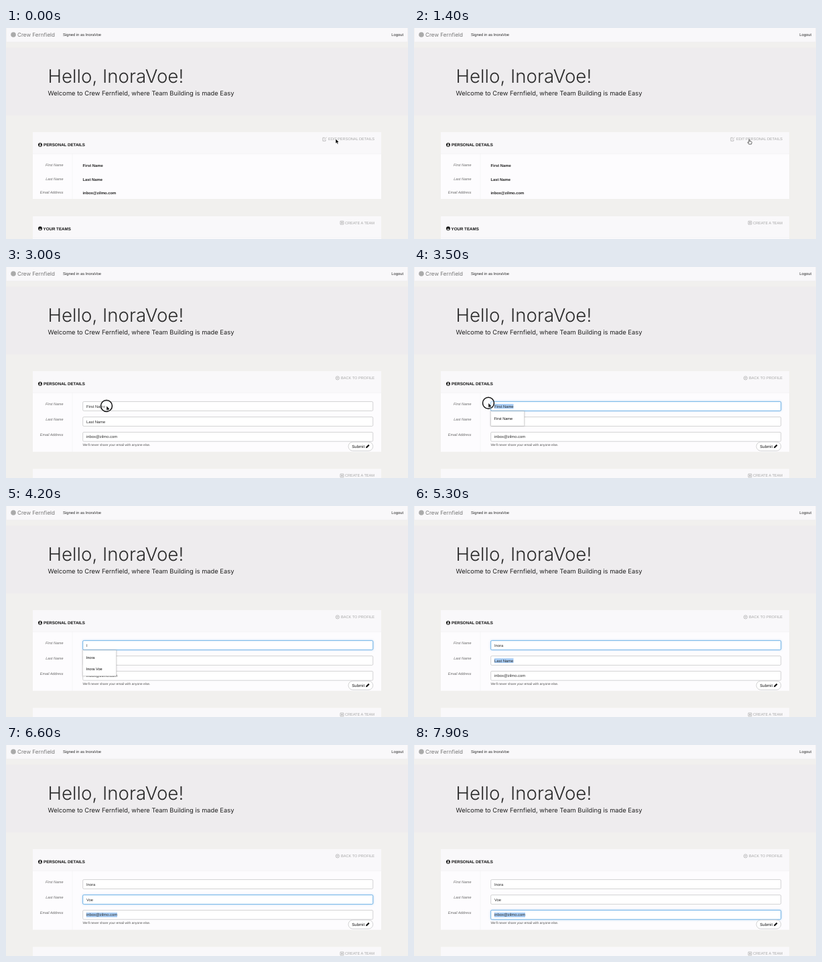
Write an HTML page that moves like this. It is 600 by 316 pixels and loops after 8 s.

```html
<!DOCTYPE html>
<html lang="en">
<head>
<meta charset="utf-8">
<title>Profile form</title>
<style>
  html, body { margin: 0; width: 100%; height: 100%; overflow: hidden; background: #f1f0ee; }
  svg { display: block; width: 600px; height: 316px; }
  text { font-family: "Liberation Sans", Arial, sans-serif; font-size: 5.83px; fill: #2b2b2b; text-rendering: geometricPrecision; }
  .brand { font-family: Inter, sans-serif; }
  .label { font-size: 5.42px; font-style: italic; fill: #666; text-anchor: end; }
  .title { font-size: 6.2px; font-weight: bold; fill: #111; }
  .value { font-weight: bold; fill: #222; }
  .link { font-size: 5.62px; fill: #a6a6a6; text-anchor: end; }
  .icon { fill: none; stroke: #a6a6a6; stroke-width: .7; }
  .head { fill: #f9f8fa; }
  .body { fill: #fdfcfe; }
  .rule { stroke: #f2f1f3; stroke-width: .6; }
  .input { fill: #fff; stroke: #c4c4c6; stroke-width: .75; }
  .glow { fill: #fff; stroke: #66afe9; stroke-width: .85; filter: drop-shadow(0 0 1.5px rgba(102, 175, 233, .5)); }
  .selection { fill: #a9cef6; }
  .popup rect { fill: #fff; stroke: #c9c9c9; stroke-width: .5; filter: drop-shadow(0 .8px 1px rgba(0, 0, 0, .25)); }
  .popup text { font-size: 5.65px; fill: #111; }
</style>
</head>
<body>
<svg viewBox="0 0 600 316">
  <rect width="600" height="316" fill="#f1f0ee"/>
  <rect x=".3" y="-2" width="599.4" height="23" rx="1.5" fill="#f9f8fa" stroke="#ebeaec" stroke-width=".6"/>
  <circle cx="11" cy="10" r="3.8" fill="#aaa"/>
  <text class="brand" x="17" y="13" style="font-size:8.1px;fill:#777">Crew Fernfield</text>
  <text x="85" y="12.4">Signed in as InoraVoe</text>
  <text x="593" y="12.2" text-anchor="end">Logout</text>

  <rect y="29.5" width="600" height="101.5" fill="#eeecee"/>
  <text class="brand" x="62.5" y="82" style="font-size:27.7px;font-weight:300">Hello, InoraVoe!</text>
  <text class="brand" x="62.5" y="101.2" style="font-size:9.35px;fill:#222">Welcome to Crew Fernfield, where Team Building is made Easy</text>

  <rect class="body" id="panel" x="40" y="156" width="520" height="100"/>
  <rect class="head" x="40" y="156" width="520" height="32.5"/>
  <path class="rule" d="M40 188.5H560"/>
  <path class="rule" id="divider" d="M99 188.5V256"/>
  <circle cx="51" cy="175" r="3" fill="#111"/>
  <circle cx="51" cy="174.1" r="1.05" fill="#fff"/>
  <path d="M49.2 177Q49.4 175.6 51 175.6T52.8 177" fill="#fff"/>
  <text class="title" x="56" y="177.2">PERSONAL DETAILS</text>

  <g id="profile">
    <path class="icon" d="M477 167V169.2H472.9V164.3H476M475 167.2L478.6 163.6"/>
    <text class="link" x="550" y="168.4">EDIT PERSONAL DETAILS</text>
    <text class="label" x="85.5" y="206.8">First Name</text>
    <text class="label" x="85.5" y="227.6">Last Name</text>
    <text class="label" x="85.5" y="248.4">Email Address</text>
    <text class="value" x="114.5" y="208">First Name</text>
    <text class="value" x="114.5" y="228.7">Last Name</text>
    <text class="value" x="114.5" y="249.4">inbox@zilmo.com</text>
  </g>

  <g id="form">
    <g class="icon"><circle cx="494.8" cy="166.3" r="2.6"/><path d="M493.7 165.2L495.9 167.4M495.9 165.2L493.7 167.4"/></g>
    <text class="link" id="back" x="550" y="168.4">BACK TO PROFILE</text>
    <g id="fields"></g>
    <text x="114.5" y="267.8" style="font-size:4.93px;fill:#555">We'll never share your email with anyone else.</text>
    <rect x="511" y="262" width="36.7" height="13.3" rx="6.6" fill="#fff" stroke="#c4c4c6" stroke-width=".75"/>
    <text x="516.3" y="270.7" style="font-size:6.05px;fill:#111">Submit</text>
    <path d="M537 271.2L537.5 269.2L541 265.7L542.6 267.3L539.1 270.8Z" fill="#111"/>
  </g>

  <g id="teams">
    <rect class="body" x="40" y="282" width="520" height="60"/>
    <rect class="head" x="40" y="282" width="520" height="32.5"/>
    <path class="rule" d="M40 314.5H560"/>
    <circle cx="51" cy="300.3" r="3" fill="#111"/>
    <path d="M49.2 300.8H52.8Q52.4 302.4 51 302.4T49.2 300.8" fill="#fff"/>
    <text class="title" x="55.5" y="302.5">YOUR TEAMS</text>
    <path class="icon" d="M499 289.3H503.8V294.1H499ZM500 291.7H502.8M501.4 290.3V293.1"/>
    <text class="link" x="550" y="293.7">CREATE A TEAM</text>
  </g>

  <g id="popups"></g>
  <circle id="ring" r="8.5" fill="#fff" fill-opacity=".35" stroke="#111" stroke-width="1.5"/>
  <g id="pointer" stroke="#fff" stroke-width=".5" stroke-linejoin="round">
    <path id="arrow" d="M0 0V7L1.6 5.5L2.7 8L3.9 7.5L2.9 5.1H5Z" fill="#000"/>
    <path id="hand" d="M-.6 .4Q0 -.5 .6 .4V2.6L3 3.1Q3.9 3.4 3.7 4.5L3 7H-.6L-2.6 4.3Q-2.4 3.4 -.6 4.4Z" fill="#fff" stroke="#222" stroke-width=".7"/>
  </g>
</svg>
<script>
  const LOOP = 8000, STEP = 100;
  const $ = id => document.getElementById(id);
  const within = (t, from, to) => t >= from && t < to;
  const show = (node, on) => { node.style.display = on ? "" : "none"; };
  const ramp = (t, from, to) => {
    const k = Math.min(1, Math.max(0, (t - from) / (to - from)));
    return k * k * (3 - 2 * k);
  };

  function add(parent, tag, attrs, content = "") {
    const node = document.createElementNS("http://www.w3.org/2000/svg", tag);
    for (const key in attrs) node.setAttribute(key, attrs[key]);
    node.textContent = content;
    return parent.appendChild(node);
  }

  // typed: the times at which each letter of the new value appears
  const fields = [
    { label: "First Name", value: "First Name", y: 201.6, selectedWidth: 28.7, next: "Inora",
      focus: 3000, blur: 5300, typed: [4000, 4500, 4600, 4800, 4900] },
    { label: "Last Name", value: "Last Name", y: 224.6, selectedWidth: 28.7, next: "Voe",
      focus: 5300, blur: 6600, typed: [6000, 6300, 6400] },
    { label: "Email Address", value: "inbox@zilmo.com", y: 247.4, selectedWidth: 46.2, next: "",
      focus: 6600, blur: LOOP + 1000, typed: [] }
  ];
  for (const f of fields) {
    const box = { x: 114.7, y: f.y, width: 433, height: 13.8, rx: 1.5 };
    add($("fields"), "text", { class: "label", x: 85.5, y: f.y + 5.2 }, f.label);
    add($("fields"), "rect", { class: "input", ...box });
    f.glow = add($("fields"), "rect", { class: "glow", ...box });
    f.selection = add($("fields"), "rect", { class: "selection", y: f.y + 3.5, height: 7 });
    f.text = add($("fields"), "text", { x: 120, y: f.y + 9 });
  }

  const popups = [
    { y: 216, from: 3100, to: 4000, rows: ["First Name"] },
    { y: 216, from: 4000, to: 5300, rows: ["Inora", "Inora Voe"] },
    { y: 238.7, from: 6000, to: 6600, rows: ["Voe", "Voe Inora", "Voelia"] }
  ];
  for (const p of popups) {
    p.node = add($("popups"), "g", { class: "popup" });
    add(p.node, "rect", { x: 114.5, y: p.y, width: 50, height: 5.5 + 16.5 * p.rows.length });
    p.rows.forEach((row, i) => add(p.node, "text", { x: 119.6, y: p.y + 13 + 16.5 * i }, row));
  }

  // time, x, y
  const path = [
    [0, 492, 166], [600, 492, 166], [1400, 500.5, 167], [1800, 500.5, 167], [1900, 400, 175],
    [2000, 278, 185], [2100, 278, 185], [2400, 226.5, 191], [2700, 229, 203], [2800, 229, 203],
    [3000, 150, 208], [3100, 150, 208], [3500, 111, 203.7], [3600, 106, 203], [LOOP, 106, 203]
  ];
  function pointerAt(t) {
    const i = path.findIndex(p => p[0] > t);
    const [t0, x0, y0] = path[i - 1], [t1, x1, y1] = path[i];
    const k = (t - t0) / (t1 - t0);
    return [x0 + (x1 - x0) * k, y0 + (y1 - y0) * k];
  }

  function drawField(f, t, pointerX) {
    const count = f.typed.filter(at => t >= at).length;
    f.text.textContent = count ? f.next.slice(0, count) : f.value;
    f.glow.style.opacity = ramp(t, f.focus, f.focus + 180) - ramp(t, f.blur, f.blur + 180);
    const left = f === fields[0] ? Math.max(119.8, pointerX) : 119.8;
    const width = Math.max(0, 119.8 + f.selectedWidth - left);
    f.selection.setAttribute("x", left);
    f.selection.setAttribute("width", width);
    show(f.selection, t >= f.focus && !count);
  }

  function draw(t) {
    const editing = t >= 1500;
    const [x, y] = pointerAt(t);
    show($("profile"), !editing);
    show($("form"), editing);
    $("panel").setAttribute("height", editing ? 120.8 : 100);
    $("divider").setAttribute("d", `M99 188.5V${editing ? 276.8 : 256}`);
    $("teams").setAttribute("transform", `translate(0 ${editing ? 20.7 : 0})`);
    $("back").style.fill = t < 1900 ? "#999" : "";

    for (const f of fields) drawField(f, t, x);
    for (const p of popups) show(p.node, within(t, p.from, p.to));

    const at = `translate(${x} ${y})`;
    const onLink = within(t, 100, 1900);
    $("pointer").setAttribute("transform", at);
    $("ring").setAttribute("transform", at);
    show($("pointer"), t < 4000);
    show($("hand"), onLink);
    show($("arrow"), !onLink);
    show($("ring"), within(t, 100, 300) || within(t, 3000, 3700));
  }

  function tick() {
    draw(Math.floor(performance.now() % LOOP / STEP) * STEP);
    requestAnimationFrame(tick);
  }
  tick();
</script>
</body>
</html>
```
